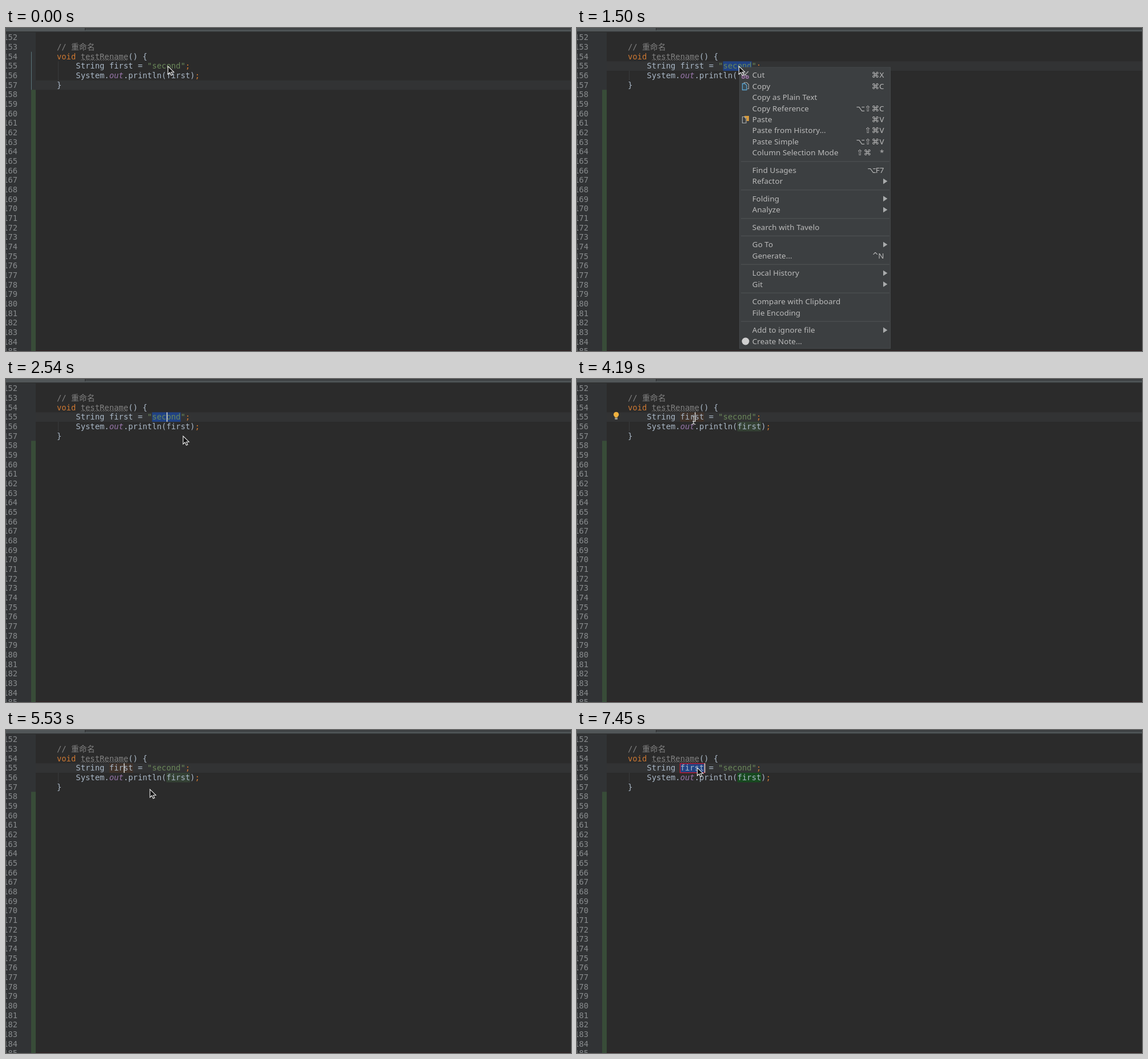
Write an HTML page that moves like this. It is 989 by 566 pixels and loops after 8 s.

```html
<!DOCTYPE html>
<html lang="en">
<head>
<meta charset="utf-8">
<title>Rename refactoring</title>
<style>
html, body { margin: 0; width: 100%; height: 100%; overflow: hidden; background: #2b2b2b; }
svg { display: block; width: 989px; height: 566px; }
text { white-space: pre; }
.code { font: 13.85px "DejaVu Sans Mono", "Noto Sans CJK SC", "Noto Sans CJK", monospace; fill: #a9b7c6; }
.ui { font: 13.4px "Noto Sans", "DejaVu Sans", sans-serif; letter-spacing: 0.08px; fill: #bbb; }
.mod { font: 13.6px "DejaVu Sans", sans-serif; fill: #bbb; }
.head { font-weight: bold; fill: #87898a; }
.on { fill: #fff; }
.num { fill: #888b8d; }
.kw { fill: #cc7832; }
.str { fill: #6a8759; }
.dim { fill: #808080; }
.out { fill: #9876aa; font-style: italic; }
</style>
</head>
<body>
<svg id="stage" viewBox="0 0 989 566" xmlns="http://www.w3.org/2000/svg"></svg>
<script>
const LOOP = 8000, CH = 8.338, LINE = 16.67, PITCH = 19.45;
const stage = document.getElementById('stage');

function add(parent, tag, attrs, content) {
  const node = document.createElementNS('http://www.w3.org/2000/svg', tag);
  for (const key in attrs) node.setAttribute(key, attrs[key]);
  if (content !== undefined) node.textContent = content;
  parent.appendChild(node);
  return node;
}
const group = (parent = stage) => add(parent, 'g', {});
const rect = (p, x, y, width, height, fill, more) => add(p, 'rect', { x, y, width, height, fill, ...more });
const path = (p, d, fill, stroke = 'none', more) => add(p, 'path', { d, fill, stroke, ...more });
const label = (p, x, y, cls, str, anchor = 'start') =>
  add(p, 'text', { x, y, class: cls, 'text-anchor': anchor }, str);
const colX = col => 55.6 + col * CH;
const lineY = n => 25 + (n - 153) * LINE;
const mark = (col, len, n, fill) => rect(stage, colX(col), lineY(n), len * CH, LINE, fill);

// Editor frame
rect(stage, 0, 0, 989, 566, '#2b2b2b');
rect(stage, 0, 0, 52, 566, '#313335');
rect(stage, 44, 108.3, 8, 458, '#384c38');
rect(stage, 52, 565, 937, 1, '#301f20');
const row = rect(stage, 52, 0, 937, LINE, '#323334');
rect(stage, 91, lineY(156), 1, LINE, '#393b3c');
const scope = group();
rect(scope, 91, lineY(155), 1, LINE, '#393b3c');
rect(scope, 44, lineY(154), 1, LINE * 4, '#59757a');
rect(stage, 0, 0, 989, 3, '#3c3f41');
rect(stage, 0, 3, 989, 3, '#4d5355');
rect(stage, 0, 0, 138, 6, '#515658');
rect(stage, 138, 0, 1, 4, '#2b2d2e');
rect(stage, 0, 6, 989, 1.5, '#303233');

// Text backgrounds
const selection = mark(24, 6, 155, '#214283');
const usage = group();
usage.append(mark(15, 5, 155, '#40332b'), mark(27, 5, 156, '#344134'));
const template = group();
template.append(mark(15, 5, 155, '#214283'), mark(27, 5, 156, '#17491f'));
rect(template, 180.5, 58.8, 43, 16, 'none', { stroke: '#c01a32', 'stroke-width': 1.4 });

// Code
const code = {
  153: [4, ['dim', '// 重命名']],
  154: [4, ['kw', 'void '], ['dim', 'testRename'], ['', '() {']],
  155: [8, ['', 'String first = '], ['str', '"second"'], ['kw', ';']],
  156: [8, ['', 'System.'], ['out', 'out'], ['', '.println(first)'], ['kw', ';']],
  157: [4, ['', '}']]
};
for (let n = 152; n <= 185; n++) {
  const y = lineY(n) + 13;
  label(stage, 20.2, y, 'code num', n, 'end');
  if (!code[n]) continue;
  const [col, ...parts] = code[n];
  const line = label(stage, colX(col), y, 'code', '');
  for (const [cls, str] of parts) add(line, 'tspan', { class: cls }, str);
}
let wave = 'M131 57';
for (let x = 133, up = true; x <= 214; x += 2, up = !up) wave += `L${x} ${up ? 55 : 57}`;
path(stage, wave, 'none', '#737373', { 'stroke-width': 0.8 });

const caret = rect(stage, 0, lineY(155), 1.6, LINE, '#d0d0d0');
const bulb = group();
add(bulb, 'circle', { cx: 68.6, cy: 62.3, r: 4.6, fill: '#f0b23f' });
rect(bulb, 66.3, 65, 4.6, 2.5, '#f0b23f');
rect(bulb, 66.3, 68, 4.6, 3, '#9a9a92');

function shortcut(p, right, y, keys) {
  if (keys === '>') return path(p, `M${right - 1.5} ${y - 4.8}l7.4 4.8l-7.4 4.8z`, '#a9abac');
  const [mods, key] = keys.split(' ');
  label(p, right, y + 4.7, key === '⌦' ? 'mod' : 'ui', key, 'end');
  const keyWidth = { '⌦': 15.5, '*': 23 }[key] || (key.length > 1 ? 15 : 9);
  [...mods].reverse().forEach((m, i) =>
    label(p, right - keyWidth - 6.3 - i * 12.9, y + 4.7, 'mod', m, 'middle'));
}

// A number in the list is a separator with that much extra space.
function list(p, items, y, box) {
  for (const item of items) {
    if (typeof item === 'number') {
      rect(p, box.lineX, y - PITCH / 2 + item / 2 - 0.5, box.lineW, 1, '#515456');
      y += item;
    } else if (item[1] === 'head') {
      const mid = box.lineX + box.lineW / 2;
      rect(p, box.x, y - 1.5, mid - 23 - box.x, 1, '#515456');
      rect(p, mid + 23, y - 1.5, box.right + 9 - mid - 23, 1, '#515456');
      label(p, mid, y + 3.7, 'ui head', item[0], 'middle');
      y += PITCH - 2;
    } else {
      label(p, box.x, y + 4.7, 'ui ' + (item[2] || ''), item[0]);
      if (item[1]) shortcut(p, box.right, y, item[1]);
      y += PITCH;
    }
  }
}

// Context menu
const menu = group();
rect(menu, 284.5, 69, 264, 492.5, '#3c3f41', { stroke: '#45484a' });
const hover = rect(menu, 285, 0, 263, PITCH, '#2a61c9');
list(menu, [
  ['Cut', '⌘ X'], ['Copy', '⌘ C'], ['Copy as Plain Text'], ['Copy Reference', '⌥⇧⌘ C'],
  ['Paste', '⌘ V'], ['Paste from History...', '⇧⌘ V'], ['Paste Simple', '⌥⇧⌘ V'],
  ['Column Selection Mode', '⇧⌘ *'], 11.05,
  ['Find Usages', '⌥ F7'], ['Refactor', '>'], 11.05,
  ['Folding', '>'], ['Analyze', '>'], 11.05,
  ['Search with Tavelo'], 11.05,
  ['Go To', '>'], ['Generate...', '^ N'], 11.05,
  ['Local History', '>'], ['Git', '>'], 11.05,
  ['Compare with Clipboard'], ['File Encoding'], 11.05,
  ['Add to ignore file', '>'], ['Create Note...']
], 82.5, { x: 306.8, right: 537.5, lineX: 287, lineW: 260 });
path(menu, 'M289 77L298 85M300 76L292 84', 'none', '#a9abac', { 'stroke-width': 1.5 });
for (const cx of [291, 298]) add(menu, 'circle', { cx, cy: 86, r: 2.2, fill: 'none', stroke: '#a477ad', 'stroke-width': 1.5 });
path(menu, 'M292.5 97V95.5H297L300.5 99V106.5H298', 'none', '#9da0a2', { 'stroke-width': 1.2 });
path(menu, 'M289.5 97.5H294L297 100.5V108.5H289.5Z', '#3c4a52', '#5ba3cf', { 'stroke-width': 1.3 });
path(menu, 'M293 154H301V163H297V158H293Z', '#d69a3c');
path(menu, 'M289.5 155.5H293L296 159V166.5H289.5Z', '#3c3f41', '#a9abac', { 'stroke-width': 1.2 });
add(menu, 'circle', { cx: 295, cy: 549, r: 6.5, fill: '#cfcfcf' });

// Refactoring popup
const refactor = group();
const clip = add(add(stage, 'defs', {}), 'clipPath', { id: 'body' });
rect(clip, 206, 94, 268, 390, '#000');
rect(refactor, 205.5, 75.5, 268, 409, '#3c3f41', { stroke: '#313334' });
rect(refactor, 206, 76, 267, 18.5, '#414344');
rect(refactor, 206, 94.3, 256, 20.2, '#2a61c9');
rect(refactor, 463, 95, 9.3, 325.5, '#636566');
label(refactor, 341, 89.2, 'ui', 'Refactor This', 'middle');
list(add(refactor, 'g', { 'clip-path': 'url(#body)' }), [
  ['1. Rename...', ' F2', 'on'], 3,
  ['2. Move...', ' F6'], ['3. Copy...', ' F5'], ['4. Safe Delete...', '⌘ ⌦'],
  ['Extract', 'head'],
  ['5. Constant...', '⌥⌘ C'], ['6. Field...', '⌥⌘ F'], ['7. Parameter...', '⌥⌘ P'],
  ['8. Functional Parameter...', '⌥⇧⌘ P'], ['9. Delegate...'], ['0. Interface...'],
  ['Superclass...'], ['Subclass...'], 3,
  ['Inline...', '⌥⌘ N'], ['Find and Replace Code Duplicates...'], 3,
  ['Pull Members Up...'], ['Push Members Down...'], ['Use Interface Where Possible...'],
  ['Replace Inheritance with Delegation...'], 3,
  ['Encapsulate Fields...']
], 104.5, { x: 213, right: 452, lineX: 206, lineW: 255 });

// Name suggestions
const names = group();
rect(names, 171.5, 77.5, 150, 53, '#3c3f41', { stroke: '#515456' });
rect(names, 172, 78, 149, 17.5, '#17395c');
['first', 'second', 'string'].forEach((s, i) => label(names, 181, 91 + i * 17.4, 'code', s));

// Pointers
const arrow = path(stage, 'M0 0V14L3.3 11L5.6 16L8 15L5.8 10.2H10.3Z', '#111', '#f2f2f2', { 'stroke-width': 1.1 });
const beam = group();
const beamShape = 'M-3.5 -7.5Q0 -7.5 0 -5Q0 -7.5 3.5 -7.5M0 -5V5M-3.5 7.5Q0 7.5 0 5Q0 7.5 3.5 7.5M-1.8 2.5H1.8';
path(beam, beamShape, 'none', '#222', { 'stroke-width': 2 });
path(beam, beamShape, 'none', '#f4f4f4', { 'stroke-width': 1 });

// Pointer holds: time, x, y
const moves = [
  [0, 283.5, 67], [1790, 287, 72], [1940, 296, 83], [2090, 305, 94], [2240, 310, 100],
  [2690, 290, 92], [2840, 250, 82], [2990, 216, 74], [3140, 204, 72],
  [4780, 214, 80], [4930, 227, 90], [5080, 241, 98], [5230, 252, 104],
  [5680, 246, 100], [5820, 238, 95], [5970, 231, 90], [6420, 219, 76], [6570, 210.5, 66]
];
const show = (node, on) => node.setAttribute('visibility', on ? 'visible' : 'hidden');

function draw(t) {
  const during = (a, b = LOOP) => t >= a && t < b;
  const [, x, y] = moves.filter(m => m[0] <= t).pop();
  const typing = during(2990, 4780);
  for (const p of [arrow, beam]) p.setAttribute('transform', `translate(${x} ${y})`);
  show(arrow, !typing);
  show(beam, typing);

  row.setAttribute('y', lineY(t < 750 ? 157 : 155));
  show(scope, t < 750);
  show(selection, during(900, 3290));
  show(usage, during(3740, 5680));
  show(template, during(5680));
  show(bulb, during(4190, 4640));

  caret.setAttribute('x', t < 3290 ? 281 : t < 5680 ? 206 : 222.8);
  show(caret, during(750, 1500) || during(2540, 4640) || during(5530));

  show(menu, during(1500, 2540));
  show(hover, during(1790, 2540));
  hover.setAttribute('y', y < 92 ? 73 : 92.4);
  show(refactor, during(4640, 5530));
  show(names, during(5970, 7010));
}

const start = performance.now();
function tick() {
  draw((performance.now() - start) % LOOP);
  requestAnimationFrame(tick);
}
tick();
</script>
</body>
</html>
```
